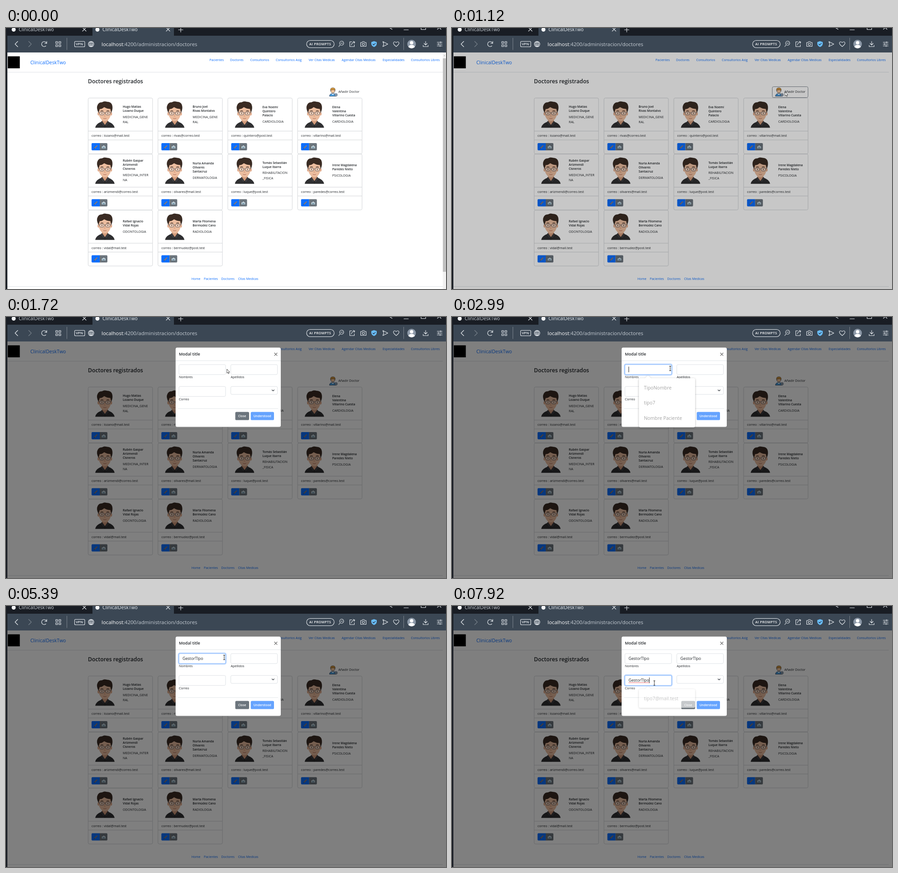
An HTML page that plays this animation: 972 px wide and 576 px high, repeating every 7990 ms.

```html
<!DOCTYPE html>
<html lang="es">
<head>
<meta charset="utf-8">
<title>Doctores</title>
<style>
html, body { margin: 0; height: 100%; overflow: hidden; background: #fff; }
svg { display: block; width: 100vw; height: 100vh; font-family: "Open Sans", "Noto Sans", sans-serif; }
text { white-space: pre; }
.line { fill: none; stroke: #e9edf1; stroke-width: 1.1; stroke-linecap: round; stroke-linejoin: round; }
</style>
</head>
<body>
<svg id="stage" viewBox="0 0 972 576">
  <defs>
    <g id="avatar">
      <path d="M16.5 65.5Q18 57 30 53H45Q57 57 58.5 65.5Z" fill="#2f2f31" stroke="#1a1a1b" stroke-width=".6"/>
      <path d="M31 44H44V54L37.5 61 31 54Z" fill="#d39c7c"/>
      <path d="M31 51 27.5 55 34 62.5 37.5 60 41 62.5 47.5 55 44 51 37.5 60Z" fill="#3b3b3e" stroke="#1b1b1c" stroke-width=".5"/>
      <path d="M37.5 60V65.5" stroke="#151515" stroke-width=".6"/>
      <ellipse cx="23.3" cy="35" rx="2" ry="3.8" fill="#dfa98a"/>
      <ellipse cx="51.3" cy="35" rx="2" ry="3.8" fill="#dfa98a"/>
      <path d="M24 20H50.5V37Q49 46 42 50.5 37.5 52.5 33 50.5 26 46 24 37Z" fill="#ecbd9f"/>
      <path d="M23.3 32Q18.5 22 21.5 16 24 9.5 31 10 36 6.5 42 8.8 51 9 53 15.5 55.5 23 51.5 32L49.8 24Q42 24 36 20 30 25 25.8 24Z" fill="#3a2b23" stroke="#231811" stroke-width=".6"/>
      <path d="M28 29Q31 27.5 34 29M41 29Q44 27.5 47 29" fill="none" stroke="#3b2a20" stroke-width="1.2"/>
      <g fill="#f3d3be" stroke="#4a4a4f" stroke-width=".8">
        <rect x="26" y="31" width="9.5" height="6.5" rx="2.2"/>
        <rect x="39.3" y="31" width="9.5" height="6.5" rx="2.2"/>
        <path d="M35.5 33H39.3M23 32.5 26 33M51.7 32.5 48.8 33" fill="none"/>
      </g>
      <circle cx="31" cy="34" r="1.1" fill="#44332a"/><circle cx="44" cy="34" r="1.1" fill="#44332a"/>
      <path d="M37.5 36 36.3 40.5H38.8" fill="none" stroke="#c98f6e" stroke-width=".7"/>
      <path d="M34 45Q37.5 46.5 41 45" fill="none" stroke="#a9604d" stroke-width=".9"/>
    </g>
    <g id="actions">
      <path d="M26 99.7H10Q8 99.7 8 101.7V113.7Q8 115.7 10 115.7H26Z" fill="#0d6efd"/>
      <path d="M26 99.7H41Q43 99.7 43 101.7V113.7Q43 115.7 41 115.7H26Z" fill="#6c757d"/>
      <path d="M14.5 111 20.5 105" stroke="#b07a48" stroke-width="1.8"/>
      <path d="M13.2 112.3 14.8 110.7" stroke="#333"/>
      <path d="M30 112V106H33V104.5H37V106H39.5V112Z" fill="#cdd8de" stroke="#34424c" stroke-width=".7"/>
      <path d="M31.5 108.5H38M33 112V110H36.5V112" fill="none" stroke="#3b6b86" stroke-width=".8"/>
    </g>
  </defs>
</svg>
<script>
const stage = document.getElementById('stage');
const LOOP = 7990, FRAME = 1000 / 15;
const BLUE = '#0d6efd', INK = '#212529', RULE = '#d3d6d9';
const BRAND = 'ClinicalDeskTwo', SAMPLE = 'GestorTIpo';

const text = (x, y, size, str, fill = INK, more = '') =>
  `<text x="${x}" y="${y}" font-size="${size}" fill="${fill}" ${more}>${str}</text>`;
const rect = (x, y, w, h, fill, more = '') =>
  `<rect x="${x}" y="${y}" width="${w}" height="${h}" fill="${fill}" ${more}/>`;
const line = (d, more = '') => `<path class="line" d="${d}" ${more}/>`;
const bold = 'font-weight="600"';

function browserChrome() {
  const cross = x => line(`M${x - 4}-1 ${x + 4} 7M${x + 4}-1 ${x - 4} 7`);
  const tab = (x, fill) => `<circle cx="${x}" cy="3.5" r="4.5" fill="#f4f6f8"/>` + text(x + 11, 7, 10.4, BRAND, fill);
  return rect(0, 0, 972, 17, '#191d24') + rect(0, 0, 3, 576, '#191d24') +
    rect(191, 0, 180, 18, '#3b4754') + rect(3, 17, 969, 37, '#3b4754') +
    tab(17, '#cfd5db') + tab(202, '#edf1f4') + cross(173) + cross(358) +
    line('M381 4H391M386-1V9M845-2 853 3M879 4H889M917-3V3.5H927V-3M953 3 957-1 961 3') +
    line('M26 29.5 20 35.5 26 41.5', 'stroke-width="1.4"') +
    line('M50 29.5 56 35.5 50 41.5', 'opacity=".35"') +
    line('M89.5 34A5.5 5.5 0 1 0 88 39.5M90 29.5V34H85.5') +
    line('M110 30H114V34H110ZM117 30H121V34H117ZM110 37H114V41H110ZM117 37H121V41H117Z') +
    line('M134.5 22V48', 'opacity=".35"') +
    rect(151.5, 29.5, 22.5, 12, 'none', 'rx="2" class="line"') + text(154.2, 38.4, 7.9, 'VPN', '#e9edf1', bold) +
    line('M182 35.5A6 6 0 1 0 194 35.5 6 6 0 1 0 182 35.5H194M188 29.5Q183 35.5 188 41.5 193 35.5 188 29.5M183 32H193M183 39H193') +
    text(211, 39.5, 11.45, '<tspan fill="#fff">localhost</tspan>:4200/administracion/doctores', '#c6cdd4') +
    rect(664, 27.5, 61, 16, 'none', 'rx="8" class="line"') +
    text(670, 38.2, 7.4, 'AI PROMPTS', '#fff', bold + ' letter-spacing=".45"') +
    line('M737 33.5A4.5 4.5 0 1 0 746 33.5 4.5 4.5 0 1 0 737 33.5M738.5 37 735 41M739.5 33.5H743.5') +
    line('M764 30.5H759.5V41H769.5V37M763 37.5Q764 32 770 31M767 29.5 770.5 31 769 34') +
    line('M783.5 32H786.5L788 30H791L792.5 32H795.5V40.5H783.5ZM787 36A2.5 2.5 0 1 0 792 36 2.5 2.5 0 1 0 787 36') +
    '<path d="M813 29 819 31V35.5Q818 40 813 42 808 40 807 35.5V31Z" fill="#69bdf7"/>' +
    line('M810.5 35.5 812.5 37.5 816 33.5', 'style="stroke:#223"') +
    line('M832.5 30 843.5 35.5 832.5 41 834.5 35.5Z') +
    line('M862 41Q855.5 36 855.8 33 857 28.5 862 32 867 28.5 868.2 33 868.5 36 862 41Z') +
    line('M878.5 22V48', 'opacity=".35"') +
    '<circle cx="896" cy="35.5" r="9.5" fill="#8d99a8"/><circle cx="896" cy="32.5" r="3.8" fill="#fff"/><path d="M889 42Q890 37.3 896 37.3T903 42Q896 48 889 42" fill="#fff"/>' +
    line('M927 29.5V37M923.5 34 927 37.5 930.5 34M921.5 38V41H932.5V38') +
    line('M952.5 31.5H963.5M952.5 35.5H963.5M952.5 39.5H963.5M960 30V33M955.5 34V37M959 38V41');
}

const doctors = [
  ['Hugo Matías|Lozano Duque', 'MEDICINA_GENE|RAL', 'lozano@mail.test'],
  ['Bruno Joel|Rivas Montalvo', 'MEDICINA_GENE|RAL', 'rivas@correo.test'],
  ['Eva Noemí|Quintero|Palacio', 'CARDIOLOGIA', 'quintero@post.test'],
  ['Elena|Valentina|Villarino Cuesta', 'CARDIOLOGIA', 'villarino@mail.test'],
  ['Rubén Gaspar|Arizmendi|Cisneros', 'MEDICINA_INTER|NA', 'arizmendi@correo.test'],
  ['Nuria Amanda|Olivares|Santacruz', 'DERMATOLOGIA', 'olivares@mail.test'],
  ['Tomás Sebastián|Luque Ibarra', 'REHABILITACION|_FISICA', 'luque@post.test'],
  ['Irene Magdalena|Paredes Nieto', 'PSICOLOGIA', 'paredes@correo.test'],
  ['Rafael Ignacio|Vidal Rojas', 'ODONTOLOGIA', 'vidal@mail.test'],
  ['Marta Filomena|Bermúdez Cano', 'RADIOLOGIA', 'bermudez@post.test'],
];

function card([name, field, mail], i) {
  const names = name.split('|'), fields = field.split('|');
  const top = 27.4 - 4.5 * (names.length - 2) - 5.6 * (fields.length - 1);
  const fieldTop = top + 9 * (names.length - 1) + 13.6;
  return `<g transform="translate(${181 + 154.25 * (i % 4)} ${154.3 + 123.75 * Math.floor(i / 4)})">` +
    rect(.5, .2, 142.3, 123.2, '#fff', `rx="3" stroke="${RULE}"`) +
    `<path d="M.5 73.2H142.8M.5 92.7H142.8" stroke="${RULE}"/><use href="#avatar"/><use href="#actions"/>` +
    names.map((s, n) => text(77, top + 9 * n, 6.7, s, INK, bold)).join('') +
    fields.map((s, n) => text(77, fieldTop + 11.2 * n, 7.1, s)).join('') +
    text(8, 86.2, 7.1, 'correo : ' + mail) + '</g>';
}

function page() {
  const nav = [[449.5, 'Pacientes'], [495, 'Doctores'], [539.5, 'Consultorios'], [596, 'Consultorios Asig'],
    [668.5, 'Ver Citas Medicas'], [741.5, 'Agendar Citas Medicas'], [832, 'Especialidades'], [894.5, 'Consultorios Libres']];
  const footer = [[409.7, 'Home'], [437, 'Pacientes'], [475.5, 'Doctores'], [512.7, 'Citas Medicas']];
  return rect(3, 54, 969, 522, '#fff') + rect(4, 62.5, 26.5, 26.5, '#000') +
    text(53.7, 80.3, 10.5, BRAND, BLUE) +
    nav.map(([x, s]) => text(x, 73, 7.1, s, BLUE)).join('') +
    footer.map(([x, s]) => text(x, 556, 7, s, BLUE)).join('') +
    `<path d="M3 97.5H965M3 570.5H965" stroke="#dee2e6"/>` +
    text(181, 122, 12.2, 'Doctores registrados', INK, bold) +
    rect(707.5, 129.5, 79, 24, 'none', 'id="addBorder" rx="3" stroke="#808890"') +
    `<path d="M714.5 150.5Q715 144.5 722 144.5T729.5 150.5Z" fill="#4a9fe0" stroke="#1d2d44" stroke-width=".8"/>
     <circle cx="722" cy="138.5" r="4.8" fill="#f6c79c" stroke="#1d2d44" stroke-width=".7"/>
     <path d="M717 138Q716 132 722 132T727 138Q722 134.5 717 138Z" fill="#d99a3c" stroke="#3a2b1a" stroke-width=".7"/>
     <path d="M719.5 145 722 148 724.5 145" fill="#fff"/>
     <circle cx="729" cy="147.5" r="3" fill="#d6e9f8" stroke="#1d2d44" stroke-width=".8"/>
     <path d="M727.3 147.5H730.7M729 145.8V149.2" stroke="#1d2d44" stroke-width=".8"/>` +
    text(734.2, 143.3, 7.15, 'Añadir Doctor') + doctors.map(card).join('') +
    `<g id="scrollbar">${rect(965, 54, 7, 522, '#f1f1f1')}${rect(965, 67, 7, 471, '#c1c1c1')}
     <path d="M967 61.5 968.5 60 970 61.5Z" fill="#999"/></g>`;
}

// Input fields with the moments they gain and lose focus, their suggestions and popup fades.
const fields = [
  { x: 382, y: 105, label: 'Nombres', focus: 1930, blur: 6400, show: 1900, hide: 3340,
    rows: ['TipoNombre', 'tipo7', 'Nombre Paciente'] },
  { x: 496.6, y: 105, label: 'Apellidos', focus: 6400, blur: 7260, show: 6530, hide: 6930,
    rows: ['TipoPersonal', 'tipo7', 'Apellido Paciente'] },
  { x: 382, y: 153.3, label: 'Correo', focus: 7260, blur: 9000, show: 7450, hide: 7870,
    rows: ['tipo7@mail.test'] },
];
const keyTimes = [3330, 3460, 3590, 3660, 3790, 3920, 4400, 4600, 4660, 4860];
const pasteTimes = [0, 6930, 7790];

const input = ({ x, y, label }, i) => `<g id="field${i}">
  ${rect(x - .5, y - .5, 104, 23, 'none', 'class="ring" rx="3" stroke="#bcd7fe" stroke-width="3.6"')}
  ${rect(x, y, 103, 22, '#fff', 'class="box" rx="2.6" stroke="#dee2e6"')}
  ${rect(x + 8, y + 5, 0, 12.5, '#0078d7', 'class="selection"')}
  ${text(x + 8, y + 14, 8.8, '', INK, 'class="value"')}
  <path class="spell" stroke="#e5484d" stroke-width=".8"/>
  ${rect(0, y + 4.5, .9, 12.5, '#111', 'class="caret"')}
  ${text(x, y + 30.3, 7, label)}</g>`;

function popup({ x, y, rows }, i) {
  const left = x + 31, top = y + 30, height = 8 + 33.5 * rows.length;
  return `<g id="popup${i}" filter="drop-shadow(0 1px 2px rgba(0,0,0,.28))">
    <path d="M${left + 13} ${top + .5}l7-6.5 7 6.5Z" fill="#fff"/>
    ${rect(left, top, 124, height, '#fff', 'rx="3.5"')}
    ${rows.map((s, n) => text(left + 11, top + 24.6 + 33.5 * n, 10.4, s, '#a3a3a3')).join('')}</g>`;
}

const modal = () => '<g id="modal">' + rect(374.7, 67.5, 232.3, 175, '#fff', 'rx="3.5"') +
  text(382, 85.2, 9, 'Modal title', INK, bold) +
  '<path d="M592.7 79 599.3 85.6M599.3 79 592.7 85.6" stroke="#666" stroke-width="1.1"/>' +
  '<path d="M375 96.5H607M380 202H601" stroke="#e3e6e9"/>' +
  fields.map(input).join('') +
  rect(496.6, 153.3, 103, 17.5, '#fff', 'rx="2.6" stroke="#dee2e6"') +
  '<path d="M587.3 160.5 590 163.2 592.7 160.5" fill="none" stroke="#343a40" stroke-width="1.1"/>' +
  rect(506.5, 209.5, 30.5, 18, '#6c757d', 'rx="2.6"') + text(521.7, 221.2, 6.8, 'Close', '#fff', bold + ' text-anchor="middle"') +
  rect(540.7, 209.5, 51.3, 18, '#65a3fe', 'rx="2.6"') + text(566.3, 221.2, 6.8, 'Understood', '#fff', bold + ' text-anchor="middle"') +
  fields.map(popup).join('') + '</g>';

stage.insertAdjacentHTML('beforeend', page() +
  rect(3, 54, 969, 522, '#000', 'id="backdrop"') + browserChrome() + modal() +
  `<path id="arrow" d="M0 0V9L2.1 7.1 3.5 10.3 4.9 9.7 3.5 6.6H6.3Z" fill="#fff" stroke="#111" stroke-width=".7"/>
   <path id="beam" d="M-2-5H2M0-5V5M-2 5H2" fill="none" stroke="#111" stroke-width=".9"/>`);

const get = id => document.getElementById(id);
const clamp = v => Math.max(0, Math.min(1, v));
const show = (el, on) => el.setAttribute('visibility', on ? 'visible' : 'hidden');
const fade = (el, v) => { el.setAttribute('opacity', v); show(el, v > 0); };

const pointer = [[133, 939, 562], [333, 880, 420], [533, 785, 215], [667, 745, 152], [800, 736, 141], [1133, 736, 141],
  [1200, 691, 145], [1400, 575, 128], [1667, 488, 115], [1733, 488, 115], [1867, 480, 115],
  [2467, 480, 115], [2600, 482, 113.5], [6133, 482, 113.5], [6400, 532, 120], [6933, 532, 120], [7267, 447, 170]];

function pointerAt(t) {
  const n = pointer.findIndex(key => key[0] > t);
  if (n < 0) return pointer.at(-1).slice(1);
  const a = pointer[Math.max(0, n - 1)], b = pointer[n];
  const u = clamp((t - a[0]) / (b[0] - a[0]));
  return [a[1] + u * (b[1] - a[1]), a[2] + u * (b[2] - a[2])];
}

function drawField(field, i, t, s) {
  const part = name => get('field' + i).querySelector('.' + name);
  const focused = t >= field.focus && t < field.blur;
  const typed = i ? (t >= pasteTimes[i] ? SAMPLE.length : 0) : keyTimes.filter(k => t >= k).length;
  const selected = i === 0 && t >= 5990 && focused;
  const glow = clamp((s - field.focus + 70) / 150) - clamp((s - field.blur + 70) / 150);
  const value = part('value'), start = field.x + 8;
  value.textContent = SAMPLE.slice(0, typed);
  value.setAttribute('fill', selected ? '#fff' : INK);
  const width = typed ? value.getComputedTextLength() : 0;
  fade(part('ring'), glow);
  part('box').setAttribute('stroke', glow > .5 ? '#86b7fe' : '#dee2e6');
  part('selection').setAttribute('width', selected ? width : 0);
  part('spell').setAttribute('d', i === 2 && typed ? `M${start} ${field.y + 16}h${width}` : '');
  const lastInput = Math.max(field.focus, ...(i ? [pasteTimes[i]] : keyTimes).filter(k => k <= t));
  part('caret').setAttribute('x', start + width);
  show(part('caret'), focused && !selected && (t - lastInput) % 1060 < 530);
  fade(get('popup' + i), clamp((s - field.show) / 150) - clamp((s - field.hide) / 160));
}

function draw(t) {
  const s = Math.floor((t + 20) / FRAME) * FRAME; // screen updates run at 15 per second
  show(get('scrollbar'), t < 1050);
  show(get('addBorder'), t >= 920 && t < 1180);
  get('backdrop').setAttribute('opacity', .5 * clamp((s - 1067) / 150));
  fields.forEach((field, i) => drawField(field, i, t, s));
  const lift = -23 * (1 - clamp((s - 1213) / 300)) ** 2;
  get('modal').setAttribute('transform', `translate(0 ${lift})`);
  get('modal').style.display = s > 1213 ? '' : 'none';
  get('modal').setAttribute('opacity', clamp((s - 1213) / 150));
  const [x, y] = pointerAt(s), overInput = t >= 1780;
  for (const id of ['arrow', 'beam']) get(id).setAttribute('transform', `translate(${x} ${y})`);
  show(get('arrow'), t >= 130 && !overInput);
  show(get('beam'), overInput);
}

const begin = performance.now();
function tick() {
  draw((performance.now() - begin) % LOOP);
  requestAnimationFrame(tick);
}
tick();
</script>
</body>
</html>
```
